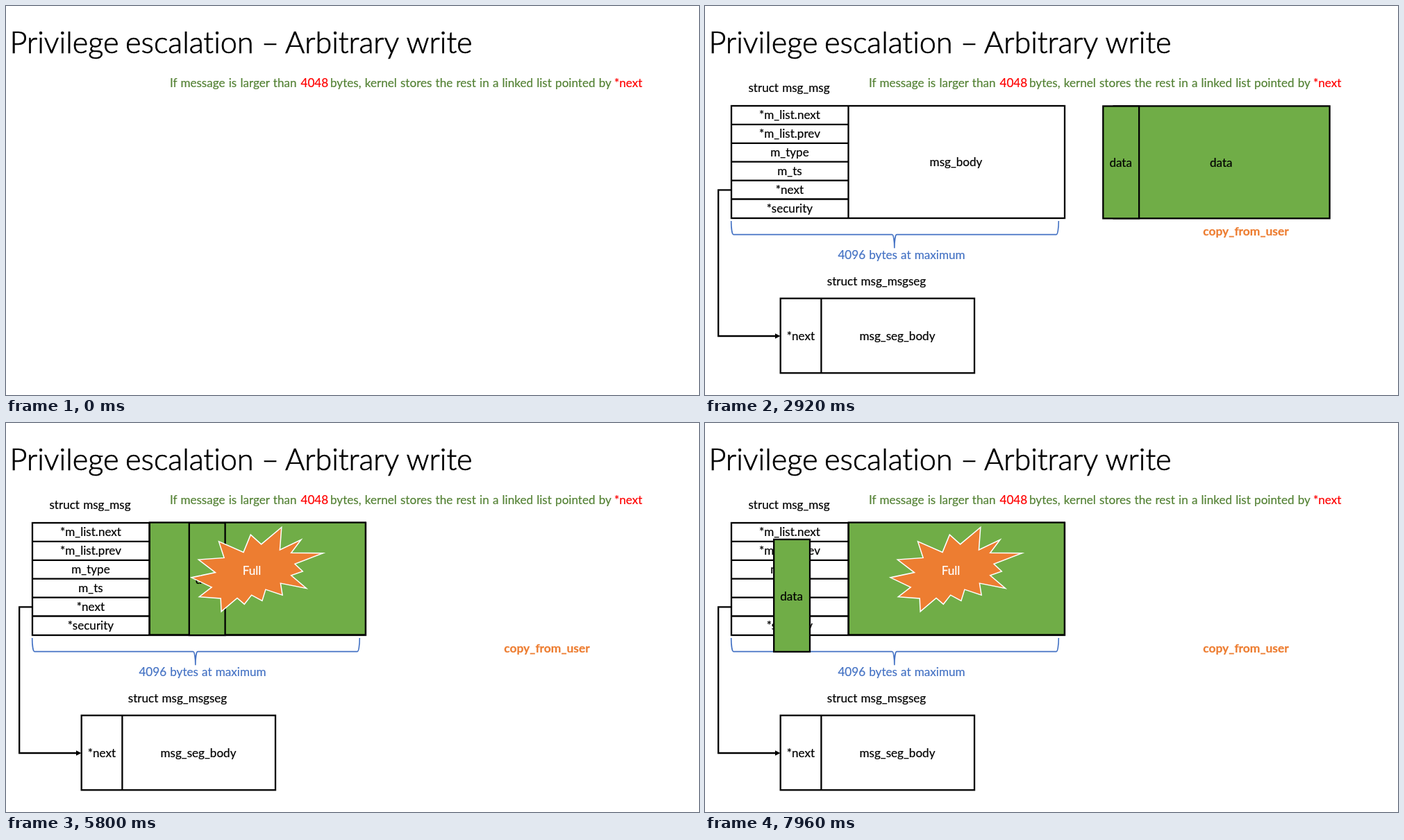
Recreate the animation shown at these times as an HTML page. Size 998 by 561 pixels, loop 8 s.

```html
<!DOCTYPE html>
<html lang="en">
<head>
<meta charset="utf-8">
<title>Privilege escalation</title>
<style>
  html, body { margin: 0; width: 100%; height: 100%; overflow: hidden; background: #fff; }
  svg { display: block; width: 998px; height: 561px; }
  text { font: 17.1px Lato, sans-serif; word-spacing: .8px; font-variant-ligatures: none; stroke: currentColor; stroke-width: .2px; }
  .mid text, text.mid { text-anchor: middle; }
  .title text { font-size: 43.2px; font-weight: 300; stroke-width: .7px; }
  .box { fill: #fff; stroke: #000; stroke-width: 2.3; }
  .line { fill: none; stroke: #000; stroke-width: 2.3; }
  .green { fill: #70ad47; }
  .note { fill: #548235; color: #548235; }
  .red { fill: #f00; color: #f00; }
  .blue { fill: #4472c4; color: #4472c4; }
  #copy { fill: #ed7d31; color: #ed7d31; font-size: 17.4px; font-weight: 700; }
  #star text { fill: #fff; color: #fff; }
</style>
</head>
<body>
<svg viewBox="0 0 998 561">
  <g class="title">
    <text x="5.5" y="68">Privilege</text>
    <text x="172" y="68">escalation</text>
    <text x="368" y="68">–</text>
    <text x="402" y="68">Arbitrary</text>
    <text x="576.5" y="68">write</text>
  </g>
  <g class="note">
    <text x="236" y="117">If message is larger than</text>
    <text x="424.5" y="117" class="red">4048</text>
    <text x="467" y="117">bytes, kernel stores the rest in a linked list pointed by</text>
    <text x="876" y="117" class="red">*next</text>
  </g>

  <g id="message" class="mid">
    <text x="121" y="124">struct msg_msg</text>
    <rect class="box" x="38" y="144" width="480" height="162"/>
    <path class="line" d="M206.5 144V306"/>
    <text x="361.5" y="231">msg_body</text>
    <g id="fields"></g>
  </g>

  <g id="brace">
    <path d="M37.7 310A3.3 19.6 0 0 0 41 329.6H269.5A3.3 19.6 0 0 1 272.8 349.2A3.3 19.6 0 0 1 276.1 329.6H506A3.3 19.6 0 0 0 509.3 310"
      fill="none" stroke="#4472c4" stroke-width="1.6"/>
    <text class="mid blue" x="283" y="365">4096 bytes at maximum</text>
  </g>

  <g id="arrow">
    <path class="line" d="M38 265.3H19.2V476H102"/>
    <path d="M101 472.2L108.5 476L101 479.8Z"/>
  </g>

  <g id="segment" class="mid">
    <text x="247" y="402.5">struct msg_msgseg</text>
    <rect class="box" x="108.7" y="421.7" width="279.3" height="107.6"/>
    <path class="line" d="M167.4 421.7V529.3"/>
    <text x="138" y="482">*next</text>
    <text x="277" y="482">msg_seg_body</text>
  </g>

  <text id="copy" class="mid" x="779" y="331">copy_from_user</text>

  <g id="big" class="mid">
    <rect class="box green" x="624.8" y="144.4" width="311" height="162"/>
    <text x="779.5" y="232">data</text>
  </g>
  <g id="small" class="mid">
    <rect class="box green" x="573.3" y="144.4" width="51.8" height="162"/>
    <text x="598.7" y="232">data</text>
  </g>

  <g id="star" class="mid">
    <polygon id="burst" stroke="#fff" stroke-width="1.5" stroke-miterlimit="10" points="
      367.6,174.9 352.3,161.1 342,186.4 306.5,170.9 314.1,194.4 277.3,197 301.5,215.6
      267,222.9 296.2,236.9 278.3,250.7 309.2,253 310.1,271.9 333,252.4 343.3,261.3
      353.6,248.1 368.9,256.4 373.9,240.1 398.1,248.1 395.4,231.1 432.6,238.4 410.7,219.7
      427.3,214 416,203.3 456.5,187.8 410.7,187.2 425,168.3 394.4,183 396.8,150.5"/>
    <text x="354" y="219">Full</text>
  </g>
</svg>
<script>
const LOOP = 8000, STEP = 40, FADE = 490, MOVE = 1865;
const STAR_AT = 4460, PULSE_AT = 6478, PULSE_HALF = 250;
const ORANGE = [237, 125, 49];

const el = id => document.getElementById(id);
const clamp = v => Math.min(1, Math.max(0, v));
const smooth = x => x * x * x * (x * (6 * x - 15) + 10);

// Parts that fade in one after another; those in one row fade together.
const fades = [['message'], ['brace'], ['arrow'], ['segment'], ['copy', 'big', 'small']];

const moves = [
  { id: 'big', legs: [{ at: 2485, dx: -418, dy: -0.9 }] },
  { id: 'small', legs: [{ at: 4482, dx: -366, dy: -0.4 }, { at: 6940, dx: -184, dy: 40.7 }] }
];

const names = ['*m_list.next', '*m_list.prev', 'm_type', 'm_ts', '*next', '*security'];
el('fields').innerHTML = names.map((name, i) => {
  const top = 144 + 26.9 * i;
  const rule = i ? `<path class="line" d="M38 ${top}H206.5"/>` : '';
  return `${rule}<text x="122" y="${top + 19.2}">${name}</text>`;
}).join('');

function draw(t) {
  fades.forEach((ids, i) => {
    const alpha = clamp((t - i * FADE) / FADE);
    ids.forEach(id => el(id).setAttribute('opacity', alpha));
  });

  for (const { id, legs } of moves) {
    let x = 0, y = 0;
    for (const { at, dx, dy } of legs) {
      const done = smooth(clamp((t - at) / MOVE));
      x += dx * done;
      y += dy * done;
    }
    el(id).setAttribute('transform', `translate(${x} ${y})`);
  }

  el('star').setAttribute('visibility', t >= STAR_AT ? 'visible' : 'hidden');
  const pale = clamp(1 - Math.abs(t - PULSE_AT - PULSE_HALF) / PULSE_HALF);
  const fill = ORANGE.map(c => Math.round(c + (255 - c) * pale));
  el('burst').setAttribute('fill', `rgb(${fill})`);
}

const start = performance.now();
function tick() {
  const t = (performance.now() - start) % LOOP;
  draw(Math.floor(t / STEP) * STEP);
  requestAnimationFrame(tick);
}
tick();
</script>
</body>
</html>
```
